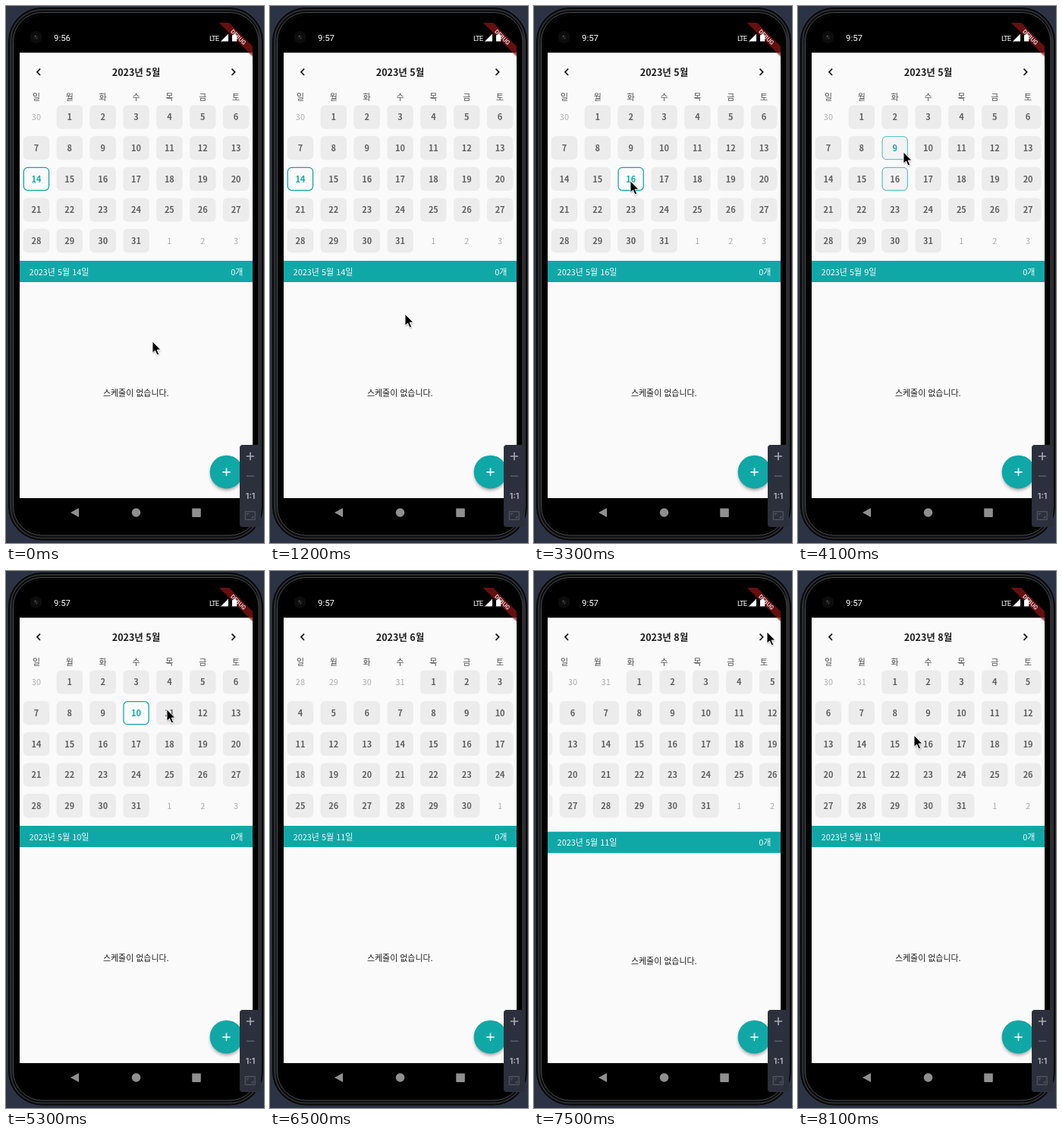
Recreate the animation shown at these times as an HTML page. Size 340 by 706 pixels, loop 8.2 s.

```html
<!DOCTYPE html>
<html lang="ko">
<head>
<meta charset="utf-8">
<style>
  html, body { margin: 0; width: 100%; height: 100%; overflow: hidden; background: #2c3344; }
  svg { display: block; width: 340px; height: 706px; }
  text { font: 10.95px "Noto Sans CJK KR", "Noto Sans CJK JP", "Noto Sans CJK", sans-serif; }
  .mid { text-anchor: middle; }
  .bold { font-weight: 700; }
  .ui { font-family: Roboto, sans-serif; fill: #fff; }
</style>
</head>
<body>
<svg viewBox="0 0 340 706" xmlns="http://www.w3.org/2000/svg">
  <defs>
    <clipPath id="screen"><rect x="18" y="22" width="307" height="625"/></clipPath>
    <clipPath id="grid"><rect id="gridBox" x="18" y="126" width="307" height="209"/></clipPath>
    <filter id="soft" x="-30%" y="-30%" width="160%" height="170%"><feGaussianBlur stdDeviation="2"/></filter>
    <filter id="faint" x="-50%" y="-50%" width="200%" height="200%"><feGaussianBlur stdDeviation="1.1"/></filter>
    <linearGradient id="rim" x2="1" y2="0">
      <stop offset="0" stop-color="#26282a"/><stop offset=".012" stop-color="#0a0a0b"/>
      <stop offset=".985" stop-color="#0a0a0b"/><stop offset="1" stop-color="#3a3c3e"/>
    </linearGradient>
  </defs>

  <!-- phone body -->
  <rect width="340" height="706" fill="#2c3344"/>
  <rect x="3.5" y="2.5" width="335" height="699.5" rx="44" fill="#0a0a0b" stroke="#050506"/>
  <rect x="6" y="5" width="330" height="694.5" rx="41.5" fill="url(#rim)" stroke="#2b2d2f" stroke-width="2"/>
  <rect x="9.5" y="8.5" width="323.5" height="687.5" rx="38" fill="#030303" stroke="#484b4d"/>
  <rect x="13.5" y="13" width="315.5" height="678" rx="33" fill="#000"/>

  <g clip-path="url(#screen)">
    <rect x="18" y="61.4" width="307" height="586" fill="#fafafa"/>
    <g fill="none" stroke="#111" stroke-width="1.7">
      <path d="M45 82.6L41 86.8L45 91"/>
      <path d="M297.6 82.6L301.6 86.8L297.6 91"/>
    </g>
    <text id="title" class="mid bold" x="171.5" y="92.2" fill="#1d1d1d" style="font-size:12.5px"></text>
    <g id="week" fill="#4f4f4f"></g>
    <g clip-path="url(#grid)"><g id="pages"></g></g>
    <g id="bar" fill="#fafafa">
      <rect x="18" y="335" width="307" height="28" fill="#0fa8a7"/>
      <text id="date" x="30.6" y="353.6"></text>
      <text x="312.4" y="353.6" text-anchor="end">0개</text>
    </g>
    <text id="empty" class="mid" x="171.3" y="513" fill="#1e1e1e">스케줄이 없습니다.</text>
    <circle cx="290.5" cy="615.4" r="21" fill="#000" opacity=".38" filter="url(#soft)"/>
    <circle cx="290.5" cy="612.6" r="21.9" fill="#0fa8a7"/>
    <path d="M285.2 612.8H295.8M290.5 607.5V618.1" stroke="#fff" stroke-width="1.6"/>
    <g transform="translate(325 22) rotate(45)">
      <rect x="-31.3" y="22" width="62.6" height="9.4" fill="#000" opacity=".35" filter="url(#faint)"/>
      <rect x="-31.3" y="21.9" width="62.6" height="9.4" fill="#b71c1c" opacity=".56"/>
      <text class="ui mid bold" x="0" y="29.4" style="font-size:7.8px" opacity=".8">DEBUG</text>
    </g>
  </g>

  <!-- status bar -->
  <circle cx="39.5" cy="41" r="8" fill="#0c0c0c"/>
  <circle cx="39.5" cy="41" r="3.4" fill="#181818"/>
  <circle cx="38.7" cy="39.7" r="1" fill="#555"/>
  <circle cx="40.5" cy="42.3" r=".8" fill="#444"/>
  <text id="clock" class="ui" x="63" y="46" style="font-size:11.4px"></text>
  <text class="ui" x="268" y="45.5" style="font-size:9.6px;letter-spacing:-.9px">LTE</text>
  <path d="M283 46.5L293 36.5V46.5Z" fill="#fff"/>
  <path d="M298 38.2H299.6V37H302.6V38.2H304.2V46.5H298Z" fill="#fff"/>

  <!-- navigation bar -->
  <g fill="#8f8f8f">
    <path d="M85 666L96 660V672Z"/>
    <circle cx="171.5" cy="666" r="5.8"/>
    <rect x="245.2" y="660.5" width="11.6" height="11.4" rx=".8"/>
  </g>

  <!-- zoom panel -->
  <rect x="308" y="577" width="28" height="108" rx="4" fill="#2c303c"/>
  <g fill="none" stroke="#a3a6ae" stroke-width="1.7">
    <path d="M316.8 592H327.2M322 586.8V597.2"/>
    <path d="M316.8 618H327.2" stroke="#565a66"/>
    <g stroke="#565a66" stroke-width="1.1">
      <rect x="315.3" y="664.7" width="12.8" height="10.6"/>
      <path d="M317.8 669.5V667.2H320.1M325.6 670.5V672.8H323.3"/>
    </g>
  </g>
  <text class="mid" x="322" y="648" fill="#a8abb3" style="font:700 10.5px Inter,sans-serif">1:1</text>

  <g id="cursor">
    <path d="M0 0V15.2L3.5 12L6 17.8L8.6 16.7L6.1 11H10.8Z" fill="#000" opacity=".3"
      transform="translate(.6 1.4)" filter="url(#faint)"/>
    <path d="M0 0V15.2L3.5 12L6 17.8L8.6 16.7L6.1 11H10.8Z" fill="#000" stroke="#fff" stroke-width=".9"/>
  </g>
</svg>
<script>
const LOOP = 8200, PAGE_W = 307, COL = 43.86, ROW = 40.67, LEFT = 39.93;
const TEAL = "#0fa8a7", INK = "#616161", CELL = 236, OPEN = 250;
const $ = id => document.getElementById(id);
const clamp = v => Math.max(0, Math.min(1, v));
const easeOut = v => 1 - (1 - clamp(v)) ** 3;
const smooth = v => v * v * (3 - 2 * v);
const gray = v => `rgb(${v},${v},${v})`;

function add(parent, tag, attrs, label) {
  const el = document.createElementNS("http://www.w3.org/2000/svg", tag);
  set(el, attrs);
  if (label !== undefined) el.textContent = label;
  return parent.appendChild(el);
}
function set(el, attrs) {
  for (const k in attrs) el.setAttribute(k, attrs[k]);
}

const picks = [[-1000, 14], [2900, 16], [3980, 9], [4700, 10], [5450, 11]]; // time, day
const turns = [6050, 6600, 7300]; // taps on the next arrow
const path = [ // time, x, y
  [0, 193, 441], [900, 193, 441], [1200, 178, 405], [1400, 178, 405],
  [2100, 86, 229], [2250, 86, 229], [2400, 114, 225], [2600, 127, 230],
  [3650, 127, 230], [3900, 139, 192], [4200, 139, 192], [4500, 175, 186],
  [5000, 175, 186], [5300, 212, 182], [5500, 212, 182], [5800, 305, 80],
  [7000, 307, 80], [7700, 307, 80], [8100, 153, 216], [8200, 153, 216]
];

const mayCells = {};
const rowCounts = [];

// Rounded cell around (x, y), pulled in on every side by inset.
function cell(page, x, y, inset, attrs) {
  return add(page, "rect", {
    x: x - 17.2 + inset, y: y - 15.6 + inset, width: 34.4 - 2 * inset, height: 31.2 - 2 * inset,
    rx: 5.8 - inset, ...attrs
  });
}

function buildMonth(index) {
  const month = 4 + index;
  const lead = new Date(2023, month, 1).getDay();
  const days = new Date(2023, month + 1, 0).getDate();
  const rows = Math.ceil((lead + days) / 7);
  const page = add($("pages"), "g", { transform: `translate(${index * PAGE_W} 0)` });
  for (let i = 0; i < rows * 7; i++) {
    const n = i - lead + 1, inside = n > 0 && n <= days;
    const x = LEFT + (i % 7) * COL, y = 146 + Math.floor(i / 7) * ROW;
    const box = inside && cell(page, x, y, 0, { fill: gray(CELL) });
    const ring = inside && cell(page, x, y, .6, { fill: "none", stroke: TEAL, opacity: 0 });
    const label = add(page, "text", {
      x, y: y + 4.3, class: inside ? "mid bold" : "mid", fill: inside ? INK : "#aeaeae"
    }, new Date(2023, month, n).getDate());
    if (inside && index === 0) mayCells[n] = { box, ring, label };
  }
  rowCounts.push(rows);
}

[..."일월화수목금토"].forEach((d, i) => add($("week"), "text", { x: LEFT + i * COL, y: 123.5, class: "mid" }, d));
for (let i = 0; i < 4; i++) buildMonth(i);

function cursorAt(t) {
  const i = Math.max(1, path.findIndex(p => p[0] > t));
  const [a, b] = [path[i - 1], path[i]];
  const k = smooth((t - a[0]) / (b[0] - a[0]));
  return [a[1] + (b[1] - a[1]) * k, a[2] + (b[2] - a[2]) * k];
}

function paintPicks(t) {
  let day = 14;
  picks.forEach(([start, n], i) => {
    const end = i + 1 < picks.length ? picks[i + 1][0] : LOOP;
    const on = t >= start && t < end;
    const k = clamp((t - start) / 250) * (1 - clamp((t - end) / 250));
    const { box, ring, label } = mayCells[n];
    box.setAttribute("fill", gray(Math.round(CELL + (OPEN - CELL) * k)));
    set(ring, { opacity: clamp(k * 1.7), "stroke-width": .5 + .8 * k });
    label.setAttribute("fill", on ? TEAL : INK);
    if (on) day = n;
  });
  return day;
}

function draw(t) {
  const day = paintPicks(t);
  let pos = 0, rows = rowCounts[0];
  turns.forEach((start, i) => {
    pos += easeOut((t - start) / 300);
    rows += (rowCounts[i + 1] - rowCounts[i]) * smooth(clamp((t - start - 60) / 200));
  });
  const drop = (rows - 5) * 37;
  $("pages").setAttribute("transform", `translate(${-pos * PAGE_W} 0)`);
  $("gridBox").setAttribute("height", 209 + drop);
  $("bar").setAttribute("transform", `translate(0 ${drop})`);
  $("empty").setAttribute("transform", `translate(0 ${drop / 2})`);
  $("title").textContent = `2023년 ${5 + Math.round(pos)}월`;
  $("date").textContent = `2023년 5월 ${day}일`;
  $("clock").textContent = t < 1000 ? "9:56" : "9:57";
  set($("cursor"), {
    transform: `translate(${cursorAt(t)})`,
    visibility: t >= 6450 && t < 6600 ? "hidden" : "visible"
  });
}

const begin = performance.now();
function tick() {
  draw((performance.now() - begin) % LOOP);
  requestAnimationFrame(tick);
}
tick();
</script>
</body>
</html>
```
